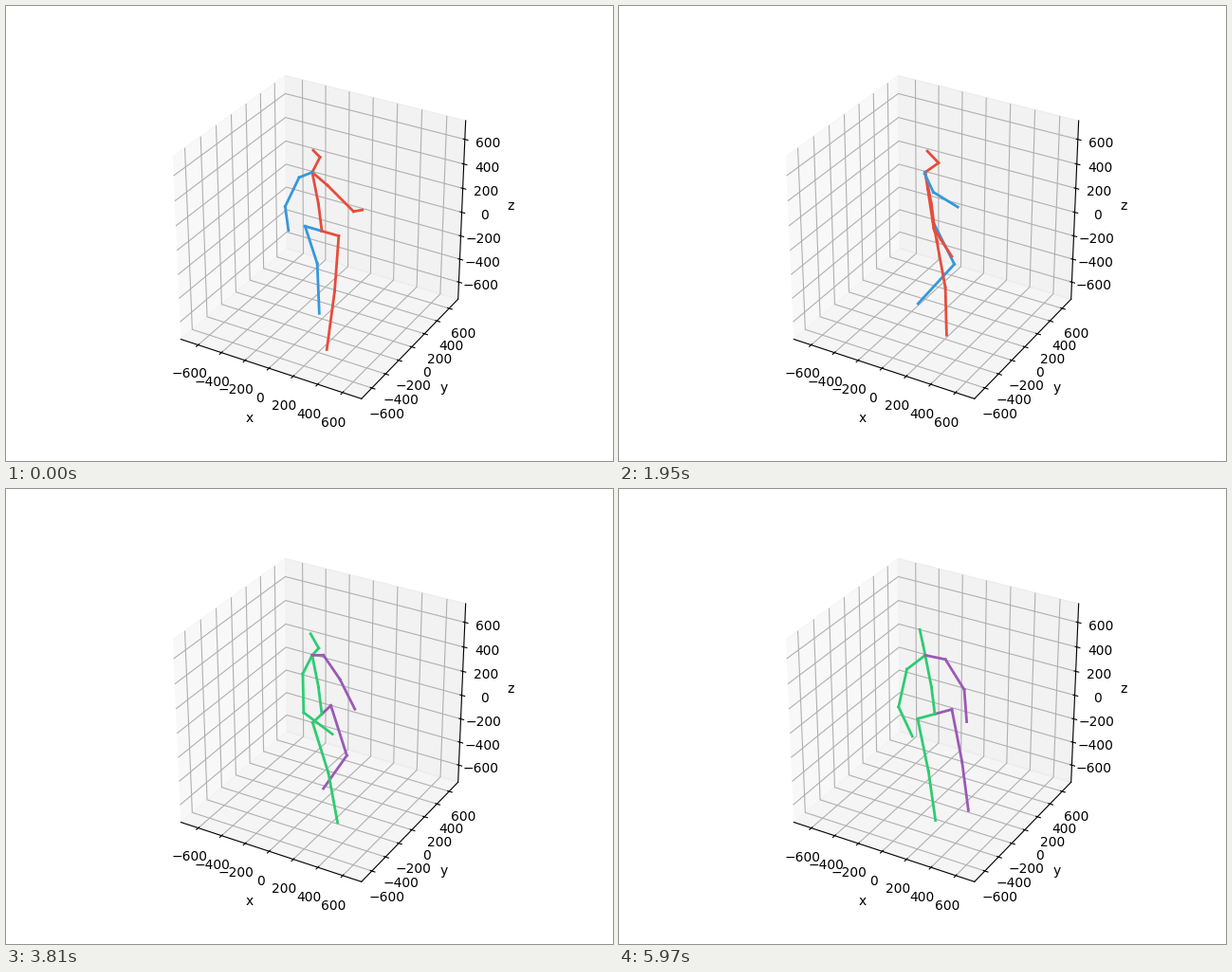
A matplotlib script that plays this animation: 640 by 480 pixels, repeating every 6000 ms.

```python
import numpy as np
import matplotlib.pyplot as plt
from matplotlib.animation import FuncAnimation

FRAMES, INTERVAL = 200, 30
LOOP, SWITCH = 6.0, 3.0     # seconds: the second walker takes over halfway
RADIUS = 750                # half extent of the axes, mm
CYCLE = 1.09                # seconds per double step
THIGH, SHIN, HIP = 442, 454, 140

SCREEN_RIGHT = np.array([np.sqrt(3) / 2, 0.5, 0])   # for azim -60
UP = np.array([0, 0, 1])

CHAINS = [
    ("root", "hipL", "kneeL", "ankleL"),
    ("root", "hipR", "kneeR", "ankleR"),
    ("root", "spine", "neck", "head", "top"),
    ("neck", "shoulderR", "elbowR", "wristR"),
    ("neck", "shoulderL", "elbowL", "wristL"),
]
BONES = [pair for chain in CHAINS for pair in zip(chain, chain[1:])]
COLORS = [("#3498db", "#e74c3c"), ("#9b59b6", "#2ecc71")]


def first_arms(t):
    """Upper arm and forearm per side as (ahead, outward, down) in mm."""
    lift = max(0, np.sin(np.pi * t / 2.4))
    left = (190 * lift - 31, 100 + 50 * lift, 250 - 45 * lift), \
           (70 + 200 * lift, 17, 238 - 170 * lift)
    right = (105 - 35 * t, 155 - 50 * t, 220 + 35 * t), \
            (230 * np.cos(t / 2), 28 * t - 54, 115 + 180 * np.sin(t / 2) ** 2)
    return {"L": left, "R": right}


def second_arms(t):
    """Arms of the second walker, settling into a resting pose."""
    left = (100 - 135 * np.exp(-t / 0.4), 100, 225), \
           (140 - 16 * t, -10 * t, 210)
    right = (66 * np.exp(-t), 35 + 12 * t, 285), \
            (238 - 10 * t, 0, 105 + 10 * t)
    return {"L": left, "R": right}


def pose_at(t):
    """Joint positions in mm, relative to the pelvis."""
    second = t >= SWITCH
    tau = t - SWITCH if second else t
    heading = np.radians(-122 * (t / LOOP) ** 0.72)
    side = np.array([np.cos(heading), np.sin(heading), 0])
    ahead = np.array([-np.sin(heading), np.cos(heading), 0])

    pose = {"root": np.zeros(3)}
    pose["spine"] = 222 * UP - 24 * SCREEN_RIGHT
    pose["neck"] = 480 * UP - 68 * SCREEN_RIGHT
    pose["head"] = pose["neck"] + (110 - 4 * t ** 2) * ahead + 70 * UP
    pose["top"] = pose["head"] + (8 * t - 95) * ahead + 98 * UP

    amp = np.exp(-(tau / 1.5) ** 4) if second else 1
    phase = 2 * np.pi * (tau / CYCLE - 0.08)
    lean = -min(65 * t, 130) * side     # feet drift outward on the turn
    arms = second_arms(tau) if second else first_arms(tau)
    shoulder = 155 if second else 116

    for s, out, theta in (("L", -side, phase), ("R", side, phase + np.pi)):
        swing = np.arcsin((40 + 225 * amp * np.cos(theta)) / 890)
        flex = 0.12 + 0.95 * amp * max(0, -np.sin(theta)) ** 2
        joint = pose["hip" + s] = HIP * out
        for name, size, a in (("knee", THIGH, swing + 0.4 * flex),
                              ("ankle", SHIN, swing - 0.6 * flex)):
            joint = joint + size * (np.sin(a) * ahead - np.cos(a) * UP) + lean / 2
            pose[name + s] = joint

        joint = pose["neck"] + shoulder * out - 73 * UP + 7 * SCREEN_RIGHT
        pose["shoulder" + s] = joint
        for name, (f, o, d) in zip(("elbow", "wrist"), arms[s]):
            joint = joint + f * ahead + o * out - d * UP
            pose[name + s] = joint
    return pose


def drift(t):
    """Small sideways shift of the pelvis in mm."""
    return np.array([-2 * np.clip((t - SWITCH) / 1.5, 0, 1), 0, 0])


fig = plt.figure(figsize=(6.4, 4.8), dpi=100)
ax = fig.add_subplot(projection="3d")
ax.set_box_aspect((1, 1, 1))
ax.set(xlabel="x", ylabel="y", zlabel="z")
lines = [ax.plot([0, 0], [0, 0], [0, 0], lw=2)[0] for _ in BONES]


def update(i):
    t = i * INTERVAL / 1000
    root, pose = drift(t), pose_at(t)
    left, right = COLORS[t >= SWITCH]
    for line, (a, b) in zip(lines, BONES):
        line.set_data_3d(*np.transpose([root + pose[a], root + pose[b]]))
        line.set_color(left if b.endswith("L") else right)
    for set_lim, c in zip((ax.set_xlim3d, ax.set_ylim3d, ax.set_zlim3d), root):
        set_lim(c - RADIUS, c + RADIUS)
    return lines


anim = FuncAnimation(fig, update, frames=FRAMES, interval=INTERVAL,
                     init_func=lambda: update(0), repeat=True, repeat_delay=0)
plt.show()
```
